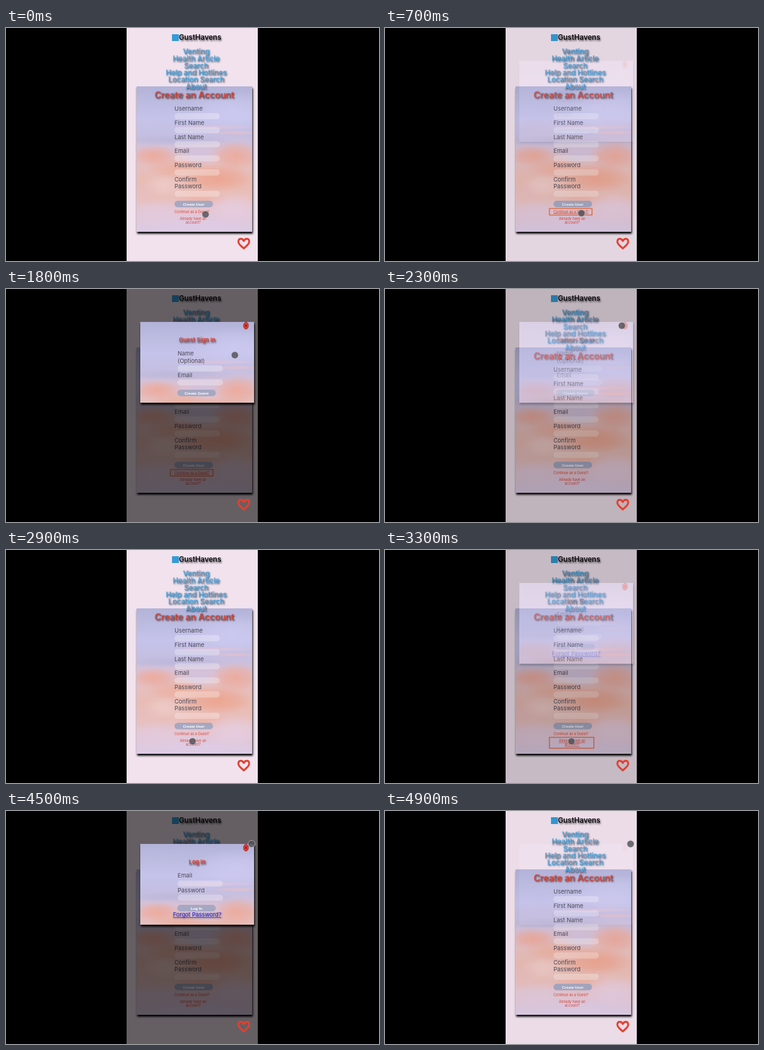
An HTML page with a canvas that plays this animation: 600x375 px, repeating every 5 s.

```html
<!DOCTYPE html>
<html lang="en">
<head>
<meta charset="utf-8">
<title>Create an Account</title>
<style>
  html, body { margin: 0; width: 100%; height: 100%; overflow: hidden; background: #000; }
  canvas { display: block; width: 600px; height: 375px; }
</style>
</head>
<body>
<canvas id="stage" width="600" height="375"></canvas>
<script>
const W = 600, H = 375, LOOP = 5000, STEP = 100;
const PAGE = { x: 194, w: 211 };
const RED = '#db4331', BLUE = '#4ba6df', INK = '#4a4955', LINK = '#de4630';
const stage = document.getElementById('stage').getContext('2d');

function layer(paint) {
  const c = document.createElement('canvas');
  c.width = W;
  c.height = H;
  paint(c.getContext('2d'));
  return c;
}

// Text is centred vertically on y.
function text(g, str, x, y, size, color, o = {}) {
  g.save();
  g.font = `${o.weight || 400} ${size}px ${o.font || 'Inter, sans-serif'}`;
  g.textAlign = o.align || 'center';
  g.fillStyle = color;
  if (o.shadow) {
    g.shadowColor = o.shadow;
    g.shadowOffsetX = g.shadowOffsetY = 1.2;
    g.shadowBlur = 2.5;
  }
  g.fillText(str, x, y + size * 0.36);
  if (o.underline) {
    const w = g.measureText(str).width;
    const left = g.textAlign === 'center' ? x - w / 2 : x;
    g.fillRect(left, y + size * 0.5, w, Math.max(0.6, size * 0.08));
  }
  g.restore();
}

function pill(g, x, y, w, h, color) {
  g.fillStyle = color;
  g.beginPath();
  g.roundRect(x, y, w, h, h / 2);
  g.fill();
}

const label = (g, str, x, y) => text(g, str, x, y, 9.4, INK, { align: 'left' });
const field = (g, x, y) => pill(g, x, y, 73, 9.8, 'rgba(255,255,255,.27)');

function button(g, str, x, y) {
  pill(g, x, y, 62, 10.4, '#a6a8c2');
  text(g, str, x + 31, y + 5.3, 6.2, '#fff', { weight: 700, font: '"Liberation Sans", sans-serif' });
}

// Painted evening sky: x, y, rx, ry, rgb, alpha
const SKY = ['#b3b2d8', '#bcbbe0', '#c5c3ea', '#c4bfe2', '#d9c1d3', '#e6bfbe', '#e9bbb2', '#e8c0bd', '#e2c6d6', '#dccbe4'];
const CLOUDS = [
  [155, 40, 75, 32, '209,206,244', 0.6],
  [125, 66, 75, 4, '232,196,214', 0.6],
  [160, 75, 45, 4, '240,192,196', 0.6],
  [60, 87, 100, 9, '184,182,218', 0.75],
  [28, 112, 40, 17, '240,166,146', 0.8],
  [160, 112, 42, 24, '238,168,150', 0.85],
  [66, 132, 52, 18, '238,170,148', 0.65],
  [130, 148, 58, 24, '238,158,134', 0.75],
  [102, 110, 32, 17, '209,194,222', 0.9],
  [44, 160, 36, 18, '238,205,203', 0.8],
  [12, 172, 26, 22, '231,190,192', 0.6],
  [105, 182, 48, 15, '239,176,160', 0.65],
  [35, 206, 60, 22, '226,203,222', 0.8],
  [158, 198, 52, 26, '230,206,226', 0.8],
  [100, 226, 90, 16, '222,204,230', 0.7]
];

function sky(g, x, y, w, h) {
  g.save();
  g.shadowColor = '#000';
  g.shadowOffsetX = 1;
  g.shadowOffsetY = 3;
  g.shadowBlur = 3;
  g.fillStyle = '#c4c3e8';
  g.fillRect(x, y, w, h);
  g.restore();
  g.save();
  g.beginPath();
  g.rect(x, y, w, h);
  g.clip();
  g.translate(x, y);
  g.scale(w / 187, w / 187);
  const base = g.createLinearGradient(0, 0, 0, 234);
  SKY.forEach((c, i) => base.addColorStop(i / (SKY.length - 1), c));
  g.fillStyle = base;
  g.fillRect(0, 0, 187, 236);
  for (const [cx, cy, rx, ry, rgb, a] of CLOUDS) {
    g.save();
    g.translate(cx, cy);
    g.scale(rx, ry);
    const puff = g.createRadialGradient(0, 0, 0, 0, 0, 1);
    puff.addColorStop(0, `rgba(${rgb},${a})`);
    puff.addColorStop(0.5, `rgba(${rgb},${a * 0.65})`);
    puff.addColorStop(1, `rgba(${rgb},0)`);
    g.fillStyle = puff;
    g.fillRect(-1, -1, 2, 2);
    g.restore();
  }
  g.restore();
}

const page = layer(g => {
  g.fillStyle = '#000';
  g.fillRect(0, 0, W, H);
  g.fillStyle = '#f1e2ee';
  g.fillRect(PAGE.x, 0, PAGE.w, H);
  sky(g, 210, 94, 186, 234);

  g.fillStyle = '#359bd6';
  g.fillRect(267, 10, 11, 11);
  text(g, 'GustHavens', 278, 15.2, 11.6, '#0c0c10', { weight: 600, align: 'left', shadow: 'rgba(0,0,0,.7)' });

  ['Venting', 'Health Article', 'Search', 'Help and Hotlines', 'Location Search', 'About'].forEach((str, i) =>
    text(g, str, 306, 38 + i * 11.25, 11.6, BLUE, { weight: 500, shadow: 'rgba(15,30,50,.9)' }));
  text(g, 'Create an Account', 303, 108, 14.4, RED, { weight: 500, shadow: 'rgba(30,5,5,.9)' });

  ['Username', 'First Name', 'Last Name', 'Email', 'Password', 'Confirm'].forEach((str, i) => {
    label(g, str, 271, 130 + i * 22.7);
    field(g, 271, i < 5 ? 137 + i * 22.65 : 262);
  });
  label(g, 'Password', 271, 254.6);
  button(g, 'Create User', 271, 278);
});

function modal(title, paint) {
  return layer(g => {
    g.fillStyle = 'rgba(0,0,0,.58)';
    g.fillRect(PAGE.x, 0, PAGE.w, H);
    sky(g, 216, 53, 183, 130);
    text(g, title, 307.5, 82, 9.2, RED, { weight: 600, shadow: 'rgba(30,5,5,.8)' });
    paint(g);

    g.fillStyle = '#e03a2c';
    g.strokeStyle = '#8e2a24';
    g.lineWidth = 0.8;
    g.beginPath();
    g.ellipse(386, 59, 4, 5.6, 0, 0, Math.PI * 2);
    g.fill();
    g.stroke();
    text(g, 'x', 386, 58.4, 7, '#3a1210');
  });
}

const guest = modal('Guest Sign In', g => {
  label(g, 'Name', 276, 104);
  label(g, '(Optional)', 276, 115.5);
  field(g, 276, 123);
  label(g, 'Email', 276, 139);
  field(g, 276, 145.5);
  button(g, 'Create Guest', 275.5, 162);
});

const login = modal('Log In', g => {
  label(g, 'Email', 276, 104);
  field(g, 276, 112);
  label(g, 'Password', 276, 127.5);
  field(g, 276, 134.5);
  button(g, 'Log In', 275.5, 151);
  text(g, 'Forgot Password?', 307.5, 166.5, 9.2, '#2424d4', { underline: true, shadow: 'rgba(20,20,60,.45)' });
});

function links(g, t) {
  const onGuest = t >= 500 && t < 2100, onLogin = t >= 3100 && t < 4500;
  text(g, 'Continue as a Guest?', 271, 295.5, 5.6, LINK, { align: 'left', underline: onGuest });
  text(g, 'Already have an', 301, 307, 5.6, LINK, { underline: onLogin });
  text(g, 'account?', 301, 313.3, 5.6, LINK, { underline: onLogin });
  g.strokeStyle = '#e8764f';
  g.lineWidth = 1.6;
  if (onGuest) g.strokeRect(264.5, 290.5, 68.5, 10.5);
  if (onLogin) g.strokeRect(264.5, 301.5, 71.5, 17.5);
}

function heart(g) {
  g.strokeStyle = '#e2412f';
  g.lineWidth = 3;
  g.lineJoin = 'round';
  g.beginPath();
  g.moveTo(382.5, 342.8);
  g.bezierCurveTo(380, 337.6, 373.8, 338, 373.8, 344);
  g.bezierCurveTo(373.8, 348.4, 379, 351.2, 382.5, 354.8);
  g.bezierCurveTo(386, 351.2, 391.2, 348.4, 391.2, 344);
  g.bezierCurveTo(391.2, 338, 385, 337.6, 382.5, 342.8);
  g.closePath();
  g.stroke();
}

const ramp = (t, a, b) => {
  const u = Math.min(1, Math.max(0, (t - a) / (b - a)));
  return u * u * (3 - 2 * u);
};

// Pointer stops: time, x, y
const STOPS = [
  [0, 321, 300], [500, 316, 298], [1300, 316, 298], [2000, 381, 59], [2300, 381, 59],
  [2800, 300, 308], [3350, 300, 308], [3700, 388, 107], [4200, 395, 53], [LOOP, 395, 53]
];

function pointer(g, t) {
  const i = STOPS.findIndex(s => s[0] > t);
  const [t0, x0, y0] = STOPS[i - 1], [t1, x1, y1] = STOPS[i];
  const k = ramp(t, t0, t1);
  g.fillStyle = 'rgba(78,76,82,.8)';
  g.strokeStyle = 'rgba(205,203,208,.6)';
  g.lineWidth = 1;
  g.beginPath();
  g.arc(x0 + (x1 - x0) * k, y0 + (y1 - y0) * k, 5.6, 0, Math.PI * 2);
  g.fill();
  g.stroke();
}

function show(g, img, alpha) {
  if (alpha <= 0) return;
  g.globalAlpha = alpha;
  g.drawImage(img, 0, 0);
  g.globalAlpha = 1;
}

function draw(t) {
  stage.drawImage(page, 0, 0);
  links(stage, t);
  show(stage, guest, ramp(t, 620, 1050) - ramp(t, 2080, 2450));
  show(stage, login, ramp(t, 3150, 3560) - ramp(t, 4530, 4950));
  heart(stage);
  pointer(stage, t);
}

const start = performance.now();
function tick() {
  const t = (performance.now() - start) % LOOP;
  draw(Math.floor(t / STEP) * STEP);
  requestAnimationFrame(tick);
}
tick();
</script>
</body>
</html>
```
